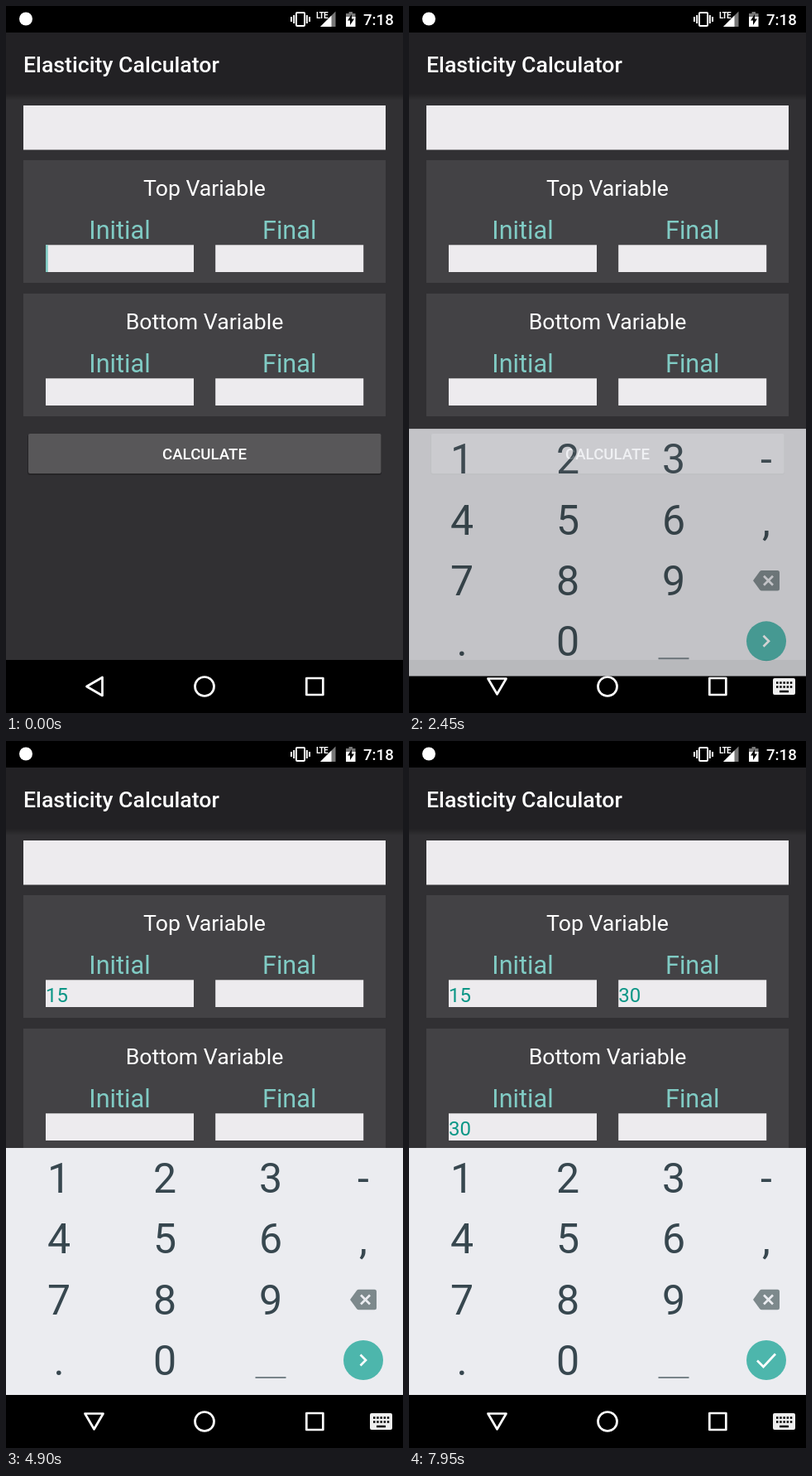
Recreate the animation shown at these times as an HTML page. Size 480 by 853 pixels, loop 8 s.

```html
<!DOCTYPE html>
<html lang="en">
<head>
<meta charset="utf-8">
<title>Elasticity Calculator</title>
<style>
html, body { margin: 0; width: 100%; height: 100%; overflow: hidden; background: #000; }
svg { display: block; width: 480px; height: 853px; font-family: Roboto, sans-serif; }
.mid { text-anchor: middle; }
.medium { font-weight: 500; }
.line { fill: none; stroke: #fff; }
.label { font-size: 30.67px; fill: #80cbc4; }
.heading { font-size: 26.67px; fill: #fff; }
.value { font-size: 24px; fill: #0c9686; }
.digit { font-size: 50px; fill: #37474f; }
</style>
</head>
<body>
<svg viewBox="0 0 480 853">
  <defs>
    <linearGradient id="shade" x2="0" y2="1">
      <stop stop-color="#000" stop-opacity=".3"/>
      <stop offset="1" stop-color="#000" stop-opacity="0"/>
    </linearGradient>
  </defs>
  <rect width="480" height="853" fill="#313033"/>

  <!-- status bar -->
  <rect width="480" height="32" fill="#000"/>
  <circle cx="24" cy="15.5" r="8" fill="#fff"/>
  <g class="line" stroke-width="2">
    <rect x="351" y="8" width="10" height="16" rx="1"/>
    <path d="M345 13v6M348.2 11v10M363.8 11v10M367 13v6"/>
  </g>
  <path d="M380 25L398.500 6.500V25Z" fill="#777"/>
  <path d="M380 25L393.500 11.500V25Z" fill="#fff"/>
  <rect x="374" y="5" width="15" height="11" fill="#000"/>
  <text x="375" y="14.500" font-size="10" font-weight="700" fill="#fff" textLength="auto" letter-spacing="-.8">LTE</text>
  <path d="M411 9h3.500v-2h4.500v2h3.500v6h-11.500z" fill="#777"/>
  <path d="M411 13h11.500v12h-11.500z" fill="#fff"/>
  <path d="M418 10l-5 7.500h3v5.500l5-7.500h-3z" fill="#000"/>
  <text class="medium" x="432" y="23" font-size="18.67" fill="#fff">7:18</text>

  <!-- app -->
  <rect y="32" width="480" height="74" fill="#222124"/>
  <rect y="106" width="480" height="8" fill="url(#shade)"/>
  <text class="medium" x="21" y="79.500" font-size="26.67" fill="#fff">Elasticity Calculator</text>
  <rect x="21" y="120" width="438" height="53.500" fill="#edebee"/>
  <g id="cards"></g>
  <rect x="26" y="517" width="428" height="49" rx="3" fill="#000" opacity=".25"/>
  <rect x="27" y="516" width="426.500" height="48" rx="2" fill="#585759"/>
  <text class="mid medium" x="240" y="547" font-size="18.67" fill="#fff">CALCULATE</text>

  <!-- navigation bar -->
  <rect y="789" width="480" height="64" fill="#000"/>
  <g class="line" stroke="#fff" stroke-width="2.700" stroke-linejoin="round">
    <path id="back"/>
    <circle cx="240" cy="821" r="11.500"/>
    <rect x="363.300" y="811" width="20" height="20"/>
  </g>
  <g id="switcher">
    <rect x="440" y="811" width="27" height="20" rx="2" fill="#eee"/>
    <path d="M444 816.500h20M444 821.500h20" stroke="#000" stroke-width="2.500" stroke-dasharray="2.500 1.700"/>
    <path d="M448 827h11" stroke="#000" stroke-width="2.500"/>
  </g>

  <!-- keypad -->
  <g id="pad">
    <rect y="491" width="480" height="298" fill="#eceff1"/>
    <rect y="491" width="480" height="298" fill="#ebecf0"/>
    <rect id="press" width="120" height="55.500" fill="#d2d3d7"/>
    <g id="keys"></g>
    <path d="M301.500 768h37" stroke="#78848a" stroke-width="2"/>
    <path d="M416 674l8-11q1-1.300 2.500-1.300h19q2.500 0 2.500 2.500v19.600q0 2.500-2.500 2.500h-19q-1.500 0-2.500-1.300z" fill="#7d898c"/>
    <path d="M429 668.500l11 11m0-11l-11 11" stroke="#ebecf0" stroke-width="2.700"/>
    <circle cx="432" cy="747" r="24" fill="#4db6ac"/>
    <path id="action" class="line" stroke-width="2.700"/>
  </g>
</svg>
<script>
const LOOP = 8000, TICK = 50, DIGIT = 13.47;
const OPEN = 2350, SLIDE_START = 2378;
const $ = id => document.getElementById(id);

function add(parent, tag, attrs, text = '') {
  const el = document.createElementNS('http://www.w3.org/2000/svg', tag);
  for (const k in attrs) el.setAttribute(k, attrs[k]);
  el.textContent = text;
  return parent.appendChild(el);
}

const fields = [];
['Top', 'Bottom'].forEach((name, row) => {
  const g = add($('cards'), 'g', { transform: `translate(0 ${row * 161})` });
  add(g, 'rect', { x: 21, y: 186, width: 438, height: 148, fill: '#434245' });
  add(g, 'text', { x: 240, y: 228.5, class: 'heading mid' }, name + ' Variable');
  ['Initial', 'Final'].forEach((label, col) => {
    const x = 48 + col * 205.2;
    add(g, 'text', { x: x + 89.5, y: 281, class: 'label mid' }, label);
    add(g, 'rect', { x, y: 288.3, width: 179, height: 32.7, fill: '#edebee' });
    fields.push({
      x,
      value: add(g, 'text', { x, y: 314.5, class: 'value' }),
      cursor: add(g, 'rect', { y: 288.3, width: 2.7, height: 32.7, fill: '#80cbc4' })
    });
  });
});

['123-', '456,', '789', '.0'].forEach((row, r) => [...row].forEach((ch, c) =>
  add($('keys'), 'text', { x: [64, 192, 320, 432][c], y: 545 + r * 73.4, class: 'digit mid' }, ch)));

const keyPos = { 1: [4, 499.5], 3: [260, 499.5], 5: [132, 573], 0: [132, 720] };

// time, field values, field with visible cursor (-1: none), pressed key
const steps = [
  [0, [], 0], [500, [], -1], [1050, [], 0], [1550, [], -1], [2000, [], 0],
  [2450, [], -1], [3000, [], 0],
  [3550, [], -1, 1], [3650, ['1'], 0], [3750, ['1'], 0, 5], [3850, ['15'], 0],
  [4350, ['15'], 1], [4900, ['15'], -1],
  [5250, ['15'], -1, 3], [5350, ['15', '3'], 1],
  [5500, ['15', '3'], 1, 0], [5600, ['15', '30'], 1],
  [6100, ['15', '30'], 2], [6650, ['15', '30'], -1],
  [6900, ['15', '30'], -1, 3], [7000, ['15', '30', '3'], 2],
  [7050, ['15', '30', '3'], 2, 0], [7150, ['15', '30', '30'], 2],
  [7500, ['15', '30', '30'], -1], [7900, ['15', '30', '30'], -1, 1],
  [7950, ['15', '30', '30'], -1]
];

const show = (el, on) => { el.style.display = on ? '' : 'none'; };
const left = (time, span) => 1 - Math.min(1, Math.max(0, time / span));

function render(time) {
  const t = Math.floor(time / TICK) * TICK;
  const [, values, focus, key] = steps.filter(s => s[0] <= t).pop();

  fields.forEach((f, i) => {
    const text = values[i] || '';
    f.value.textContent = text;
    f.cursor.setAttribute('x', f.x + text.length * DIGIT);
    show(f.cursor, i === focus);
  });

  show($('press'), key !== undefined);
  if (key !== undefined) {
    $('press').setAttribute('x', keyPos[key][0]);
    $('press').setAttribute('y', keyPos[key][1]);
  }

  const open = t >= OPEN;
  show($('switcher'), open);
  $('back').setAttribute('d', open ? 'M95.500 811.500h22l-11 18.800z' : 'M97.500 821l19-11v22z');

  const age = t - SLIDE_START;
  show($('pad'), age > 0);
  $('pad').setAttribute('transform', `translate(0 ${(76 * left(age, 300) ** 5).toFixed(1)})`);
  $('pad').setAttribute('opacity', 1 - left(age, 180) ** 3);
  $('action').setAttribute('d', t >= 6100 ? 'M421 747.500l7.500 7.500 14.500-15.500' : 'M428.500 740.500l6.500 6.500-6.500 6.500');
}

const start = performance.now();
function frame() {
  render((performance.now() - start) % LOOP);
  requestAnimationFrame(frame);
}
frame();
</script>
</body>
</html>
```
